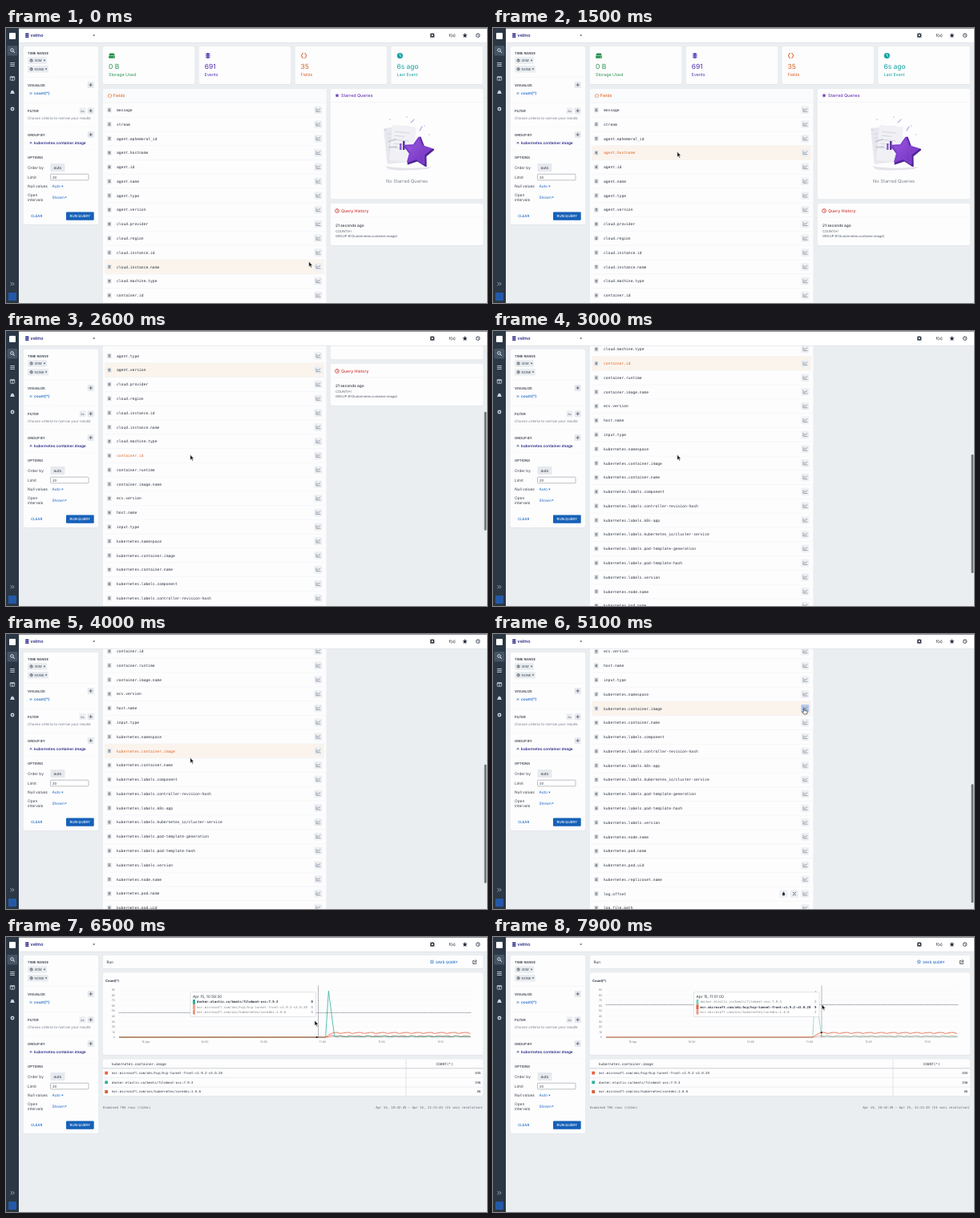
Recreate the animation shown at these times as an HTML page. Size 600 px wide and 343 px high, loop 8000 ms.

```html
<!DOCTYPE html>
<html lang="en">
<head>
<meta charset="utf-8">
<title>Query console</title>
<style>
html, body { margin: 0; width: 600px; height: 343px; overflow: hidden; background: #ebeef1; }
svg { display: block; font-family: Inter, Roboto, sans-serif; text-rendering: geometricPrecision; }
.mono { font-family: "DejaVu Sans Mono", "Noto Sans Mono", monospace; }
.line { fill: none; stroke-linecap: round; stroke-linejoin: round; }
</style>
</head>
<body>
<svg id="stage" width="600" height="343" viewBox="0 0 600 343"></svg>
<script>
const LOOP = 8000, ROW = 17.78, TOP = 93.4;
const BLUE = '#1b66c4', NAVY = '#2b2a86', INK = '#2c3440', ORANGE = '#e0692f', PURPLE = '#6a33b5', RED = '#d0392f';
const HCP = '#e8603c', TEAL = '#2fb09a', CORE = '#d95a35';

// Drawing helpers; text is placed by its vertical centre
const text = (x, y, s, size, fill = INK, extra = '') =>
  `<text x="${x}" y="${y + size * .36}" font-size="${size}" fill="${fill}" ${extra}>${s}</text>`;
const mono = (x, y, s, size, fill, extra = '') => text(x, y, s, size, fill, 'class="mono" ' + extra);
const box = (x, y, w, h, fill, r = 0, extra = '') =>
  `<rect x="${x}" y="${y}" width="${w}" height="${h}" rx="${r}" fill="${fill}" ${extra}/>`;
const line = (d, color, w = .6, extra = '') =>
  `<path class="line" d="${d}" stroke="${color}" stroke-width="${w}" ${extra}/>`;
const shape = (d, fill, extra = '') => `<path d="${d}" fill="${fill}" ${extra}/>`;
const dot = (x, y, r, fill, extra = '') => `<circle cx="${x}" cy="${y}" r="${r}" fill="${fill}" ${extra}/>`;
const card = (x, y, w, h) => box(x, y + .5, w, h, '#dce0e5', 2) + box(x, y, w, h, '#fdfdfe', 2);
const caret = (x, y, color) => shape(`M${x - 1.3} ${y - .7}h2.6l-1.3 1.6z`, color);
const star = (x, y, r, k = .45, turn = 0) => 'M' + Array.from({ length: 10 }, (_, i) => {
  const a = i * Math.PI / 5 - Math.PI / 2 + turn, q = i % 2 ? r * k : r;
  return (x + q * Math.cos(a)).toFixed(2) + ' ' + (y + q * Math.sin(a)).toFixed(2);
}).join('L') + 'Z';
const clock = (x, y, r, color) => line(`M${x} ${y - r * .6}v${r * .7}l${r * .5} ${r * .3}`, color) +
  `<circle cx="${x}" cy="${y}" r="${r}" fill="none" stroke="${color}" stroke-width=".8"/>`;
const disk = (x, y, color) => shape(`M${x - 2.6} ${y - 3}h5.2l1.3 3h-7.8z`, color) +
  box(x - 3.9, y + .4, 7.8, 2.8, color, .6) + dot(x + 2.3, y + 1.8, .5, '#fff');
const layers = (x, y, color) => [-2, 0, 2].map(d =>
  shape(`M${x - 3.5} ${y + d}l3.5 -1.7l3.5 1.7l-3.5 1.7z`, color, 'stroke="#fff" stroke-width=".4"')).reverse().join('');
const braces = (x, y, color, k = 1) => line(
  `M${x - k} ${y - 3 * k}q${-1.4 * k} 0 ${-1.4 * k} ${1.5 * k}t${-1.2 * k} ${1.5 * k}q${1.2 * k} 0 ${1.2 * k} ${1.5 * k}t${1.4 * k} ${1.5 * k}` +
  `M${x + k} ${y - 3 * k}q${1.4 * k} 0 ${1.4 * k} ${1.5 * k}t${1.2 * k} ${1.5 * k}q${-1.2 * k} 0 ${-1.2 * k} ${1.5 * k}t${-1.4 * k} ${1.5 * k}`, color, k);

const fields = ['message', 'stream',
  ...['ephemeral_id', 'hostname', 'id', 'name', 'type', 'version'].map(s => 'agent.' + s),
  ...['provider', 'region', 'instance.id', 'instance.name', 'machine.type'].map(s => 'cloud.' + s),
  ...['id', 'runtime', 'image.name'].map(s => 'container.' + s),
  'ecs.version', 'host.name', 'input.type',
  ...['namespace', 'container.image', 'container.name', 'labels.component', 'labels.controller-revision-hash',
    'labels.k8s-app', 'labels.kubernetes_io/cluster-service', 'labels.pod-template-generation',
    'labels.pod-template-hash', 'labels.version', 'node.name', 'pod.name', 'pod.uid', 'replicaset.name'].map(s => 'kubernetes.' + s),
  'log.offset', 'log.file.path'];

function fieldRow(name, i) {
  const y = TOP + ROW * (i + .5);
  let s = line(`M124 ${y + ROW / 2}H397`, '#eceef1', .5) +
    box(126, y - 3.2, 5.8, 6.4, '#e3e6ea', 1) + line(`M128 ${y - 1.2}h1.8M128 ${y}h1.8M128 ${y + 1.2}h1.8`, '#4a525c', .7) +
    mono(138, y, name, 4.66, INK, 'data-name') +
    box(384.3, y - 4.8, 10, 9.6, '#edf0f4', 1, 'data-button') +
    line(`M387 ${y - 2}v4h5M388.2 ${y + .6}l1.2 -1.4l1 .8l1.4 -1.8`, '#5b6470', .55);
  if (name === 'log.offset') s += box(357.5, y - 4.8, 10, 9.6, '#edf0f4', 1) + dot(362.5, y + .6, 1.7, INK) +
    shape(`M361 ${y}l1.5 -2.8l1.5 2.8z`, INK) + box(370.8, y - 4.8, 10, 9.6, '#edf0f4', 1) +
    line(`M374.2 ${y + 2}l3.4 -4M374.4 ${y - 1.4}h.6M376.8 ${y + 1.5}h.6`, INK, .7);
  return s;
}

function stats() {
  return [['0 B', 'Storage Used', '#2a9150', disk], ['691', 'Events', '#5231b0', layers],
    ['35', 'Fields', '#d9622b', braces], ['6s ago', 'Last Event', '#17a2a2', (x, y, c) => dot(x, y, 3.6, c) +
      line(`M${x} ${y - 2}v2l1.3 .9`, '#fff', .8)]]
    .map(([n, label, c, icon], i) => {
      const x = 121 + i * 119.8;
      return card(x, 23, 114.3, 47) + icon(x + 11, 34.5, c) + text(x + 7, 48, n, 8.5, c) + text(x + 7, 58, label, 5.3, c);
    }).join('');
}

function illustration() {
  const sheet = (x, y, w, h, turn, fill) => `<g transform="translate(${x} ${y}) rotate(${turn})">` +
    box(0, 0, w, h, fill, 1) + [0, 1, 2, 3, 4].map(i => line(`M4 ${8 + i * 5}h${i % 2 ? 12 : 18}`, '#d3d6e0', 1)).join('') + '</g>';
  return sheet(471, 125, 32, 45, -6, '#e7e8ee') + sheet(482, 121, 30, 44, 5, '#f1f1f5') +
    line('M478 141l8 -2M478 149l9 -1', '#c3c6d2', 1.6) + box(491, 144, 2.5, 8, '#8b62ce') + box(495, 141, 2.5, 11, '#5a3797') +
    shape('M473 172q22 5 58 1l-6 3q-34 3 -48 0z', '#e3e3ea') +
    shape(star(514.5, 155.5, 19, .52, .12), '#4f2596', 'stroke="#4f2596" stroke-width="2" stroke-linejoin="round"') +
    shape(star(513, 154, 17.5, .52, .12), 'url(#violet)', 'stroke="#8240cf" stroke-width="2" stroke-linejoin="round"') +
    [[479, 114], [500, 111], [522, 122], [528, 133], [473, 127]].map(p => dot(...p, .7, '#b9a1df')).join('') +
    line('M505 118l4 -4M516 128l3 -5', '#8f6acb', .8);
}

function overview() {
  return stats() + card(121, 76, 278.5, 640) + box(121, 76, 278.5, 17, '#fafbfc', 2) +
    braces(129.5, 84.5, ORANGE, .7) + text(133.5, 84.3, 'Fields', 5.2, ORANGE, 'font-weight="500"') +
    line('M121 93.2H399', '#e8eaee', .5) + box(123, 0, 274, ROW, '#fbf4ed', 0, 'id="hover"') + fields.map(fieldRow).join('') +
    card(405, 76, 190, 137.5) + line('M405 92.5H595', '#e8eaee', .5) + shape(star(413, 84.2, 2.8), PURPLE) +
    text(418, 84.3, 'Starred Queries', 5.25, PURPLE, 'font-weight="500"') + illustration() +
    text(500, 190.5, 'No Starred Queries', 5.75, '#7c848e', 'text-anchor="middle"') +
    card(405, 219, 190, 52) + line('M405 236H595', '#e8eaee', .5) + clock(413, 228, 2.4, RED) +
    text(418, 228, 'Query History', 5.2, RED, 'font-weight="500"') +
    text(411, 246, '21 seconds ago', 4.8, INK, 'font-weight="500"') + text(411, 253.2, 'COUNT(*)', 4, '#4f5863') +
    text(411, 260, 'GROUP BY(kubernetes.container.image)', 4.05, '#4f5863');
}

function queryPanel() {
  const head = (y, s) => text(27, y, s, 4.2, '#3a424d', 'font-weight="600"');
  const plus = y => box(101.7, y - 4, 8, 8, '#e6e9ee', 1) + line(`M104 ${y}h3.4M105.7 ${y - 1.7}v3.4`, '#3c4754', .7);
  const chip = (y, w, s) => box(27, y - 4.3, w, 8.6, '#e9ecf0', 1.2) + clock(31.6, y, 1.6, '#3c4754') +
    text(35.5, y, s, 4.2, '#3c4754') + caret(24 + w, y, '#3c4754');
  const term = (y, s, c) => line(`M30 ${y - 1}l2 2M32 ${y - 1}l-2 2`, c, .7) + text(35, y, s, 4.75, c, 'font-weight="600"');
  const rule = y => line(`M22 ${y}H115`, '#eef0f3', .5);
  const label = (y, s) => text(27, y, s, 4.8, '#3a424d');
  return card(22, 23, 93, 222) + head(31, 'TIME RANGE') + chip(40.5, 24, '30M') + chip(51.3, 26, 'NONE') + rule(61.5) +
    head(71, 'VISUALIZE') + plus(71) + term(81.5, 'count(*)', BLUE) + rule(93) +
    head(103.2, 'FILTER') + box(91.5, 99.2, 8, 8, '#edeff2', 1) + text(93, 103.2, 'Aa', 3.7, '#6a727c') + plus(103.2) +
    text(27, 112.5, 'Choose criteria to narrow your results', 4.4, '#727a84', 'font-style="italic"') + rule(123) +
    head(133, 'GROUP BY') + plus(133) + term(143.3, 'kubernetes.container.image', NAVY) + rule(152) +
    head(161, 'OPTIONS') + label(174, 'Order by') + box(55.5, 169, 18, 10, '#e6e9ee', 1) + text(59.5, 174, 'auto', 4.7) +
    label(186, 'Limit') + box(55.5, 182.2, 47.5, 7.6, '#fff', 1, 'stroke="#8d949d" stroke-width=".6"') + text(58, 186.1, '20', 4.2) +
    label(197.5, 'Null values') + text(57.5, 197.5, 'Auto', 4.75, BLUE) + caret(70.3, 197.5, BLUE) +
    label(208, 'Open') + label(214.3, 'intervals') + text(57.5, 211.2, 'Shown', 4.75, BLUE) + caret(74.5, 211.2, BLUE) +
    text(31, 234.7, 'CLEAR', 4.4, BLUE, 'font-weight="500"') +
    `<g id="run">${box(75, 229.5, 34.7, 10.3, '#1560b8', 1)}${text(92.3, 234.7, 'RUN QUERY', 4.35, '#fff', 'text-anchor="middle" font-weight="500"')}</g>`;
}

function chrome() {
  const c = '#c9d2db';
  return box(16, 0, 584, 18, '#fff') + box(16, 18, 584, .6, '#dadfe4') + box(16, 0, 584, .7, '#5a626b') +
    [-2, 0, 2].map(d => box(24, 8.4 + d, 4.6, 1.5, NAVY, .7)).join('') +
    text(30.5, 9.3, 'velmo', 5.5, NAVY, 'font-weight="600"') + caret(109.7, 9.3, INK) +
    dot(531.8, 9.2, 1.9, 'none', `stroke="${INK}" stroke-width="1.5"`) + line('M529.6 7l1 1M534 7l-1 1M529.6 11.4l1 -1M534 11.4l-1 -1', INK, .9) +
    text(552.5, 9.2, 'f(x)', 4.9, INK, 'font-weight="500"') + shape(star(572.5, 9.4, 3.3), INK) +
    clock(588.7, 9.2, 2.3, INK) + box(0, 0, 16, 343, '#2b3744') + box(4, 6, 8, 8, '#fff', 1) +
    box(1.5, 22, 13, 12.5, '#465565', 1.5) + dot(7.5, 27.5, 1.8, 'none', 'stroke="#fff" stroke-width=".8"') + line('M9 29l1.6 1.6', '#fff', .9) +
    line('M5.5 43.5h5M5.5 45.5h5M5.5 47.5h5', c, .9) +
    box(5.3, 60.6, 5.4, 4.6, 'none', .4, `stroke="${c}" stroke-width=".8"`) + line('M5.3 61.5h5.4M8 61v4', c, .8) +
    shape('M5 82q1 -1 1.2 -3q1.8 -2.6 3.6 0q.2 2 1.2 3z', c) + dot(8, 101, 1.7, 'none', `stroke="${c}" stroke-width="1.5"`) +
    line('M5.8 317.4l1.8 1.8l-1.8 1.8M8.3 317.4l1.8 1.8l-1.8 1.8', c, .7) + box(3, 330, 10, 10, '#2459a8', 1);
}

// Chart data: sample 0 is 10:59:30, one sample every 15 s
const X0 = 387.65, STEP = 3.675;
const px = n => X0 + n * STEP, py = v => 125 - v * .655;
const series = [
  { name: 'docker.elastic.co/beats/filebeat-oss:7.9.3', color: TEAL, at: n => n < 4 ? 0 : [88, 45, 2][n - 4] ?? [1, 1, 2, 2, 1][n % 5] },
  { name: 'mcr.microsoft.com/aks/hcp/hcp-tunnel-front:v1.9.2-v3.0.20', color: HCP, at: n => n < 4 ? 0 : [4, 7][n - 4] ?? [7, 8, 9, 9][n % 4] },
  { name: 'mcr.microsoft.com/oss/kubernetes/coredns:1.6.6', color: CORE, at: n => n < 4 ? 0 : [2, 1, 3][n % 3] },
];
const curve = s => 'M' + Array.from({ length: 120 }, (_, i) => i - 67).map(n => px(n).toFixed(2) + ' ' + py(s.at(n)).toFixed(2)).join('L');

function results() {
  const axis = [...Array(10).keys()].map(i => text(136, py(i * 10), i * 10, 3.4, '#6a727c', 'text-anchor="end"') +
    line(`M141 ${py(i * 10)}H580`, i ? '#f0f1f4' : '#9aa1aa', .4)).join('') +
    ['15 Apr', '10:50', '10:55', '11:00', '11:05', '11:10'].map((s, i) =>
      text(174.5 + i * 73.5, 131, s, 3.5, '#6a727c', 'text-anchor="middle"')).join('');
  const table = [[1, 405], [0, 206], [2, 86]].map(([k, n], i) => {
    const y = 169.6 + i * 11.7;
    return line(`M121 ${y - 5.8}H595`, i ? '#e3e6ea' : '#aab0b8', .6) + box(123.3, y - 1.9, 3.8, 3.8, series[k].color) +
      mono(132, y, series[k].name, 4.02, INK) + mono(592.3, y, n, 4.02, INK, 'text-anchor="end"');
  }).join('');
  return card(121, 23, 474, 16) + text(125.5, 31, 'Run', 4.7) +
    shape(star(531.3, 31, 2.4), 'none', `stroke="${BLUE}" stroke-width=".6"`) +
    text(536, 31.1, 'SAVE QUERY', 4.4, BLUE, 'font-weight="500"') +
    line('M584 29.5h-1.6v4h4v-1.6M584 32q0 -2.2 2.8 -2.2M585.6 28.6l1.3 1.2l-1.3 1.2', INK, .7) +
    card(121, 44.5, 474, 102.5) +
    `<g id="data">${text(124, 54.5, 'Count(*)', 4, INK, 'font-weight="700"')}${axis}` +
    [2, 0, 1].map(k => line(curve(series[k]), series[k].color, .8, `data-series="${k}"`)).join('') +
    line('', '#4a525c', .5, 'id="cross" stroke-dasharray="1 1.2"') + dot(0, 0, 1.1, '#222', 'id="mark"') +
    `<g id="tip">${box(0, 68.7, 156.5, 30.8, '#fff', 1.2, 'fill-opacity=".95" stroke="#c3c8cf" stroke-width=".5"')}` +
    text(3, 74.3, '', 4.8, INK, 'id="when"') +
    series.map((s, k) => {
      const y = 81 + k * 6.3;
      return `<g data-tip>${box(3, y - 3, 3, 6, s.color)}${mono(8, y, s.name, 4.03, INK)}${mono(153, y, '', 4.03, INK, 'text-anchor="end"')}</g>`;
    }).join('') + '</g>' +
    card(121, 152.5, 474, 45.8) + mono(132, 158, 'kubernetes.container.image', 4.34, INK) +
    mono(557.5, 158, 'COUNT(*)', 4.34, INK, 'text-anchor="end"') + table + line('M499 152.8V198', '#cfd4da', .6) +
    mono(121, 212.3, 'Examined 704 rows (&lt;12ms)', 3.95, '#5d6670') +
    mono(595, 212.3, 'Apr 15, 10:42:45 – Apr 15, 11:12:45 (15 secs resolution)', 3.98, '#5d6670', 'text-anchor="end"') + '</g>';
}

const stage = document.getElementById('stage');
stage.innerHTML = `<defs><linearGradient id="violet" x1="0" y1="0" x2="1" y2="1"><stop stop-color="#a25be6"/><stop offset="1" stop-color="#6a2fb8"/></linearGradient></defs>` +
  box(0, 0, 600, 343, '#ebeef1') + `<g id="overview">${overview()}</g><g id="results">${results()}</g>` + queryPanel() + chrome() +
  box(596.6, 0, 2.8, 148, '#6f747a', 1.4, 'id="thumb"') +
  `<g id="arrow">${shape('M0 0v6.6l1.5 -1.3l1.1 2.4l1.1 -.5l-1.1 -2.3h2z', '#111', 'stroke="#fff" stroke-width=".5"')}</g>` +
  `<g id="hand">${shape('M-.7 .6q.7 -1 1.4 0v2.4l3 .7q.6 .3 .4 1.2l-.7 2.6h-3.8l-2 -2.8q.2 -.9 1.7 .2z', '#fff', 'stroke="#111" stroke-width=".6"')}</g>`;

const el = id => document.getElementById(id);
const all = q => [...stage.querySelectorAll(q)];
const names = all('[data-name]'), buttons = all('[data-button]'), tips = all('[data-tip]'), curves = all('[data-series]');

// Keys are [time, ...values]; values ease between keys
function ease(keys, t) {
  const i = keys.findIndex(k => k[0] > t);
  if (i < 0) return keys.at(-1).slice(1);
  if (!i) return keys[0].slice(1);
  const a = keys[i - 1], b = keys[i], u = (t - a[0]) / (b[0] - a[0]), q = u * u * (3 - 2 * u);
  return a.slice(1).map((v, j) => v + (b[j + 1] - v) * q);
}
const scrollKeys = [[1650, 0], [2100, 79], [2450, 178], [2700, 178], [3000, 293], [3400, 312], [4000, 312], [4500, 365]];
const pointerKeys = [[100, 377.8, 291.3], [1100, 229.8, 154.3], [4300, 229.8, 154.3], [4900, 388, 92.5], [5200, 388, 92.5],
  [5900, 385, 104], [6500, 385, 104], [7200, 413, 92], [7700, 413, 92], [7880, 410.2, 84]];
const crossKeys = [[6500, 389.5, 94.5], [7200, 413, 92], [7700, 413, 92], [7880, 410, 84.5]];
// Hover only refreshes when scrolling pauses
const holds = [[0, 0], [2050, 79], [2480, 178], [3350, 312], [4450, 365]];

function hoverRow(t) {
  const held = (holds.findLast(h => h[0] <= t) || holds[0])[1];
  return Math.floor((ease(pointerKeys, t)[1] - TOP + held) / ROW);
}
const show = (id, on) => el(id).style.display = on ? '' : 'none';
const move = (id, x, y) => el(id).setAttribute('transform', `translate(${x} ${y})`);

function drawHover(t) {
  const [x, y] = ease(crossKeys, t), n = Math.floor((x - X0) / STEP);
  const values = series.map(s => s.at(n)), top = values.indexOf(Math.max(...values));
  el('cross').setAttribute('d', `M141 ${y}H580M${x} 61V125`);
  el('mark').setAttribute('cx', px(n));
  el('mark').setAttribute('cy', py(values[top]));
  move('tip', x - 159.5, 0);
  const sec = 59 * 60 + 30 + n * 15, pad = v => String(v).padStart(2, '0');
  el('when').textContent = `Apr 15, ${10 + Math.floor(sec / 3600)}:${pad(Math.floor(sec / 60) % 60)}:${pad(sec % 60)}`;
  tips.forEach((g, k) => {
    g.lastChild.textContent = values[k];
    g.setAttribute('font-weight', k === top ? 700 : 400);
    g.setAttribute('opacity', k === top ? 1 : .6);
  });
  curves.forEach(c => c.setAttribute('opacity', n < 1 || +c.dataset.series === top ? 1 : .55));
}

function draw(t) {
  const [scroll] = ease(scrollKeys, t), [x, y] = ease(pointerKeys, t);
  const listing = t < 5300, loaded = t >= 5800, hand = t > 4800 && t < 5300;
  show('overview', listing);
  show('results', !listing);
  show('data', loaded);
  show('thumb', listing && t > 1650);
  show('arrow', !hand);
  show('hand', hand);
  el('run').setAttribute('opacity', listing || loaded ? 1 : .6);
  move('arrow', x, y);
  move('hand', x, y);
  if (listing) {
    const row = hoverRow(t);
    move('overview', 0, -scroll);
    move('thumb', 0, 18.5 + scroll * .4626);
    move('hover', 0, TOP + hoverRow(t - 150) * ROW);
    names.forEach((n, i) => n.setAttribute('fill', i === row && x < 370 ? ORANGE : INK));
    buttons.forEach((b, i) => b.setAttribute('fill', i === row && x > 383 ? '#b4cbec' : '#edf0f4'));
  }
  if (loaded) drawHover(t);
}

function tick() {
  draw(performance.now() % LOOP);
  requestAnimationFrame(tick);
}
tick();
</script>
</body>
</html>
```
